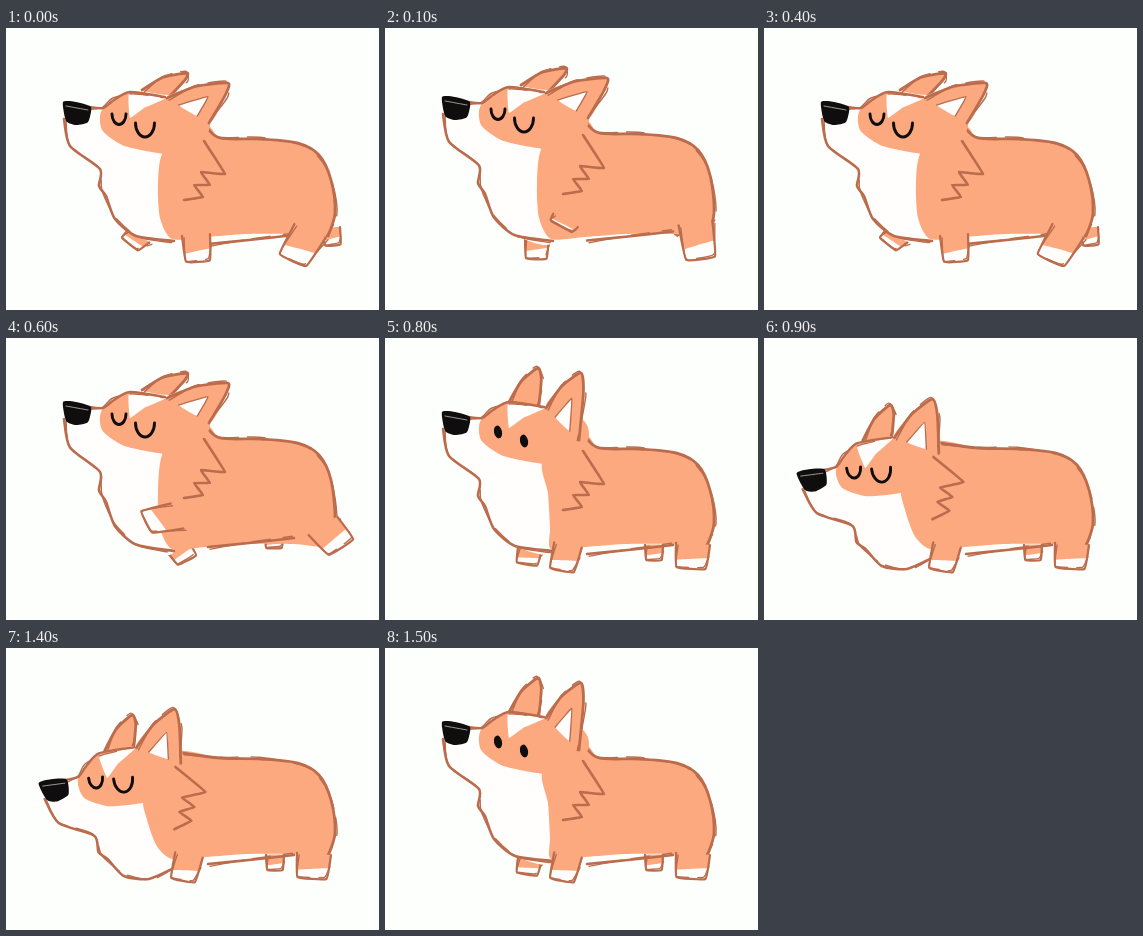
Animation of 373 by 282 pixels, one loop 1.6 s. Source, as an HTML page with a canvas:

```html
<!DOCTYPE html>
<html lang="en">
<head>
<meta charset="utf-8">
<title>Corgi walk</title>
<style>
html, body { margin: 0; width: 100%; height: 100%; overflow: hidden; background: #fdfffc; }
canvas { display: block; }
</style>
</head>
<body>
<canvas id="stage" width="373" height="282"></canvas>
<script>
const ctx = document.getElementById('stage').getContext('2d');
const PAPER = '#fdfffc', WHITE = '#fffefd', COAT = '#fca97f', LINE = '#bb6c4d', INK = '#100d0e';
const HOLD = 100, WALK_STEPS = 8, BOW_STEPS = 8;
const GROUND = 231, EYE = [137, 101], EYE_LOW = [97, 172], TILT = -.62;

// Hip and foot of each leg: planted or swung at the two ends of a stride, and at rest.
const legs = {
  frontFar: { width: 12, a: [[134, 207], [124, 216]], b: [[170, 206], [181, 222]], rest: [[145, 210], [142, 226]] },
  frontNear: { width: 14, a: [[190, 207], [192, 233]], b: [[171, 178], [141, 184]], rest: [[183, 207], [177, 232]] },
  rearFar: { width: 9, a: [[325, 200], [327, 217]], b: [[268, 200], [268, 210]], rest: [[269, 207], [269, 222]] },
  rearNear: { width: 17, a: [[304, 203], [287, 232]], b: [[317, 188], [335, 209]], rest: [[308, 206], [306, 230]] }
};

const mix = (a, b, k) => a + (b - a) * k;
const between = (p, q, k) => [mix(p[0], q[0], k), mix(p[1], q[1], k)];
const shift = (p, x, y) => [p[0] + x, p[1] + y];

function turn([x, y], angle) {
  const c = Math.cos(angle), s = Math.sin(angle);
  return [x * c - y * s, x * s + y * c];
}

// Cardinal spline through the points; bend 0 gives straight edges.
function trace(pts, closed, bend) {
  const n = pts.length;
  const at = i => closed ? pts[(i + n) % n] : pts[Math.max(0, Math.min(n - 1, i))];
  ctx.beginPath();
  ctx.moveTo(...pts[0]);
  for (let i = 0; i < (closed ? n : n - 1); i++) {
    const [p, a, b, q] = [at(i - 1), at(i), at(i + 1), at(i + 2)];
    ctx.bezierCurveTo(
      a[0] + (b[0] - p[0]) * bend, a[1] + (b[1] - p[1]) * bend,
      b[0] - (q[0] - a[0]) * bend, b[1] - (q[1] - a[1]) * bend, b[0], b[1]);
  }
  if (closed) ctx.closePath();
}

function fill(pts, color, bend = .12) {
  trace(pts, true, bend);
  ctx.fillStyle = color;
  ctx.fill();
}

function stroke(pts, color, width, bend = .12) {
  trace(pts, false, bend);
  ctx.strokeStyle = color;
  ctx.lineWidth = width;
  ctx.stroke();
}

// A firm pencil line with a looser, broken one beside it.
function sketch(pts, width = 2.6, bend = .12) {
  stroke(pts, LINE, width, bend);
  const loose = pts.map((p, i) => shift(p, 2.5 * Math.sin(i * 2.3 + 1), 2.2 * Math.cos(i * 1.9)));
  ctx.setLineDash([34, 9, 18, 13]);
  stroke(loose, LINE, 1.4, bend);
  ctx.setLineDash([]);
}

// Feet circle on flat ellipses while walking.
function legAt({ a, b, rest }, pose) {
  if (!pose.walking) return rest;
  const c = Math.cos(pose.phase), s = Math.sin(pose.phase);
  const [hip, foot] = a.map((p, i) => between(p, b[i], (1 - c) / 2));
  const half = [(a[1][0] - b[1][0]) / 2, (a[1][1] - b[1][1]) / 2];
  return [hip, shift(foot, half[1] * .4 * s, -half[0] * .4 * s)];
}

function drawLeg(leg, pose) {
  const [hip, foot] = legAt(leg, pose);
  const angle = Math.atan2(foot[1] - hip[1], foot[0] - hip[0]) - Math.PI / 2;
  const side = w => turn([w, 0], angle * .8);
  const [hx, hy] = side(leg.width), [fx, fy] = side(leg.width * .85);
  const left = shift(hip, -hx, -hy), right = shift(hip, hx, hy);
  const heel = shift(foot, -fx, -fy), toe = shift(foot, fx, fy);
  fill([left, heel, toe, right], COAT, .04);
  fill([heel, toe, between(toe, right, .45), between(heel, left, .3)], WHITE, .04);
  sketch([left, heel, toe, right], 2.3, .05);
}

function ear(a, b, tip, hasInner) {
  const pts = [a, shift(between(a, tip, .5), -2, -4), tip, shift(between(tip, b, .3), 3, 0), b];
  fill(pts, COAT, .1);
  sketch(pts, 2.8, .1);
  if (!hasInner) return;
  const inner = [between(a, b, .28), between(between(a, b, .5), tip, .5), between(a, b, .72)];
  fill(inner, WHITE, .04);
  stroke(inner, LINE, 1.4, .04);
}

function eye([x, y], width, depth, pose) {
  ctx.beginPath();
  if (pose.fold < .4) {
    ctx.ellipse(x, y + 8, 4, 6.5, -.2, 0, Math.PI * 2);
    ctx.fillStyle = INK;
    ctx.fill();
  } else {
    ctx.ellipse(x, y, width, depth, pose.bow * TILT * .3, 0, Math.PI);
    ctx.strokeStyle = INK;
    ctx.lineWidth = 2.9;
    ctx.stroke();
  }
}

// The head is one rigid shape that swings down around the near eye.
function headPlacer({ bow, lift }) {
  const [ex, ey] = between(EYE, EYE_LOW, bow);
  return (x, y) => shift(turn([x - EYE[0], y - EYE[1]], TILT * bow), ex, ey - lift);
}

function drawHead(place, pose) {
  const outline = list => list.map(p => place(...p));
  const lay = (up, back) => place(...between(up, back, pose.fold));

  ear(lay([124, 64], [136, 62]), lay([154, 67], [165, 67]), lay([153, 30], [181, 45]), false);
  fill(outline([[96, 82], [123, 65], [160, 70], [198, 82], [203, 102], [175, 128],
    [159, 126], [140, 123], [116, 117], [96, 102]]), COAT);
  fill(outline([[123, 66], [160, 70], [138, 80], [124, 90]]), WHITE, .04);
  ear(place(161, 70), lay([194, 102], [203, 95]), lay([196, 35], [222, 55]), true);
  sketch(outline([[83, 79], [97, 80], [108, 72], [124, 64], [159, 69]]), 2.4);

  fill(outline([[57, 74], [70, 74], [85, 79], [82, 94], [70, 97], [60, 93]]), INK, .1);
  stroke(outline([[60, 78], [82, 82]]), '#d8d2cf', .7);
  eye(place(113, 86), 7, 10.5, pose);
  eye(place(139, 95), 9.5, 14, pose);
}

function torsoPoints({ bow, lift, fold }) {
  const edge = mix(163, 152, fold);
  const raise = (x, y) => [x, y - lift];
  return [
    between(raise(200, 98), [138, 110], bow), raise(214, 110), raise(255, 111), raise(292, 115),
    raise(313, 127), raise(325, 152), [329, 185], [322, 208], [288, 206], [240, 206], [200, 209], [166, 211],
    between([edge + 2, 190], [142, 206], bow), between([edge, 155], [125, 190], bow),
    between(raise(158, 123), [118, 172], bow)
  ];
}

// The throat follows the head until it meets the ground.
function chinPoints(place, { bow, lift }) {
  const throat = [[58, 91], [64, 118], [94, 141], [93, 158], [100, 168], [109, 191], [130, 208]];
  const pts = throat.map((p, i) => {
    const [x, y] = place(...p);
    return [x, Math.min(y + lift * i / throat.length, GROUND - 3 * (i % 2))];
  });
  return [...pts, [168, 213 + 14 * bow]];
}

function furPoints({ bow, lift }) {
  const tip = between([219, 146 - 1.2 * lift], [180, 142], bow);
  const zigzag = [[-21, -33], [0, 0], [-24, -2], [-15, 11], [-31, 11], [-22, 23], [-41, 26]];
  return zigzag.map(p => shift(tip, ...turn(p, TILT * bow)));
}

function draw(pose) {
  ctx.fillStyle = PAPER;
  ctx.fillRect(0, 0, 373, 282);
  ctx.lineCap = ctx.lineJoin = 'round';

  const place = headPlacer(pose);
  const torso = torsoPoints(pose), chin = chinPoints(place, pose);
  const belly = [[202, 216], [243, 212], [288, 207]].map(p => shift(p, 0, -.7 * pose.lift));

  drawLeg(legs.frontFar, pose);
  drawLeg(legs.rearFar, pose);
  fill([...chin, torso[torso.length - 1]], WHITE);
  fill(torso, COAT);
  sketch(torso.slice(0, 8), 2.8, .16);
  sketch(belly);
  sketch(chin);
  drawLeg(legs.rearNear, pose);
  drawLeg(legs.frontNear, pose);
  drawHead(place, pose);
  stroke(furPoints(pose), LINE, 2.6, .03);
}

// Two strides, then a bow to the ground with small sniffs and back up.
function poseAt(step) {
  if (step < WALK_STEPS) {
    const phase = step * Math.PI / 2;
    return { walking: true, phase, lift: 5 * (1 - Math.cos(phase)), fold: 1, bow: 0 };
  }
  const t = step - WALK_STEPS;
  const down = Math.min(1, t / 2, (BOW_STEPS - 1 - t) / 2);
  const bow = down === 1 && t % 2 ? .93 : down;
  return { walking: false, lift: 0, fold: down, bow };
}

function tick() {
  draw(poseAt(Math.floor(performance.now() / HOLD) % (WALK_STEPS + BOW_STEPS)));
  requestAnimationFrame(tick);
}
tick();
</script>
</body>
</html>
```
